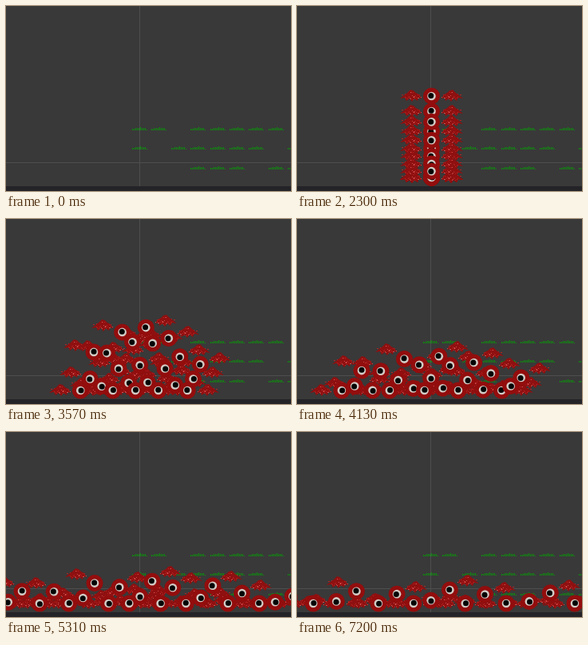
Recreate the animation shown at these times as an HTML page with a canvas. Size 357 by 232 pixels, loop 7.3 s.

```html
<!DOCTYPE html>
<html>
<head>
<meta charset="utf-8">
<style>
html, body { margin: 0; width: 357px; height: 232px; overflow: hidden; background: #393939; }
canvas { display: block; }
</style>
</head>
<body>
<canvas id="stage" width="357" height="232"></canvas>
<script>
const g = document.getElementById('stage').getContext('2d');
const LOOP = 7300, COUNT = 23, FLOOR = 215, CENTER = 169;
const START = 800, BIRTH_GAP = 100, COLLAPSE = 2500, PILED = 3020;
const clamp = v => Math.max(0, Math.min(1, v));
const mix = (a, b, p) => a + (b - a) * p;
const hash = n => Math.abs(Math.sin(n * 12.9898) * 43758.5453) % 1;

// Linear track through [time, value] pairs, held at both ends.
function track(keys, t) {
  let j = 0;
  while (j < keys.length - 2 && t >= keys[j + 1][0]) j++;
  const [t0, a] = keys[j], [t1, b] = keys[j + 1];
  return mix(a, b, clamp((t - t0) / (t1 - t0)));
}
const columnTop = [[START, 196], [1510, 168], [2300, 113], [2720, 85]];
const spread = [[PILED, 37], [4130, 111], [4630, 155], [6050, 227], [7200, 312]];
const height = [[PILED, 122], [4130, 50], [4630, 44], [6050, 25], [7200, 24]];
const layers = [0, 0.45, 1, 0.2, 0.8];

// The heap widens and sinks; its layers repeat from left to right.
function inHeap(i, t) {
  const s = (i - 11) / 11;
  const rise = track(height, t) * layers[i % 5] * (1 - 0.54 * s * s) - 7;
  return {
    x: CENTER + track(spread, t) * s * (0.72 + 0.28 * Math.abs(s)) + 4 * hash(i) - 2,
    y: FLOOR - Math.max(0, rise)
  };
}

// The highest in the heap is born first and leads the column.
const rank = [];
[...Array(COUNT).keys()]
  .sort((a, b) => inHeap(a, PILED).y - inHeap(b, PILED).y)
  .forEach((i, k) => rank[i] = k);

function place(i, t) {
  const k = rank[i];
  if (t < START + BIRTH_GAP * k) return null;
  const heap = inHeap(i, t);
  const p = clamp((t - COLLAPSE) / (PILED - COLLAPSE)) ** 2;
  const y = Math.min(FLOOR, track(columnTop, t) + 19 * k ** 0.77);
  return { i, x: mix(CENTER - 0.5, heap.x, p), y: mix(y, heap.y, p) };
}

function disc(x, y, r, color) {
  g.fillStyle = color;
  g.beginPath();
  g.arc(x, y, r, 0, 7);
  g.fill();
}

const wing = new Path2D('M-14 3L-9-1L-5-4L-1-8L3-7L6-4L10-2L13 3L9 2L8 6L4 3L1 7L-2 3L-6 6L-8 2Z');

function drawWing(x, y, side) {
  g.save();
  g.translate(Math.round(x), Math.round(y));
  g.scale(side, 1);
  g.fillStyle = '#8f1010';
  g.fill(wing);
  for (let n = 1; n < 36; n++) {
    const u = hash(n) * 24 - 12;
    const v = (hash(n + 50) * 2 - 1.1) * (6 - Math.abs(u) * 0.35);
    g.fillStyle = n % 3 ? '#b52424' : '#cc5050';
    g.fillRect(Math.round(u), Math.round(v), 1, 1);
  }
  g.restore();
}

function drawWings({ i, x, y }, t) {
  const lean = (i < 9 ? 1 : -1) * clamp((t - PILED) / 800);
  const tilt = 0.45 * lean * clamp((FLOOR - y) / 16);
  const dx = 25.5 * Math.cos(tilt), dy = 25.5 * Math.sin(tilt);
  drawWing(x - dx, y - dy, 1);
  drawWing(x + dx, y + dy, -1);
}

function drawEye({ i, x, y }) {
  const gaze = i * 2.4;
  disc(x, y, 10.5, '#930d0d');
  disc(x, y, 5.3, '#d2cbc5');
  disc(x + 0.8 * Math.cos(gaze), y + 0.8 * Math.sin(gaze), 3.5, '#050505');
}

function drawTuft(x, y) {
  for (let dx = -9; dx <= 9; dx += 2) {
    const h = 1 + Math.round((1 - Math.abs(dx) / 10) * 2 + hash(dx + 30));
    g.fillRect(x + dx, y - h, 1, h);
  }
}
const grass = ['##.#####', '#.#####.#', '...###.##'];

function drawScene() {
  g.fillStyle = '#393939';
  g.fillRect(0, 0, 357, 232);
  g.fillStyle = '#4e4e4e';
  g.fillRect(167, 0, 1, 226);
  g.fillRect(0, 196, 357, 1);
  g.fillStyle = '#0a940a';
  grass.forEach((row, r) => [...row].forEach((cell, c) => {
    if (cell === '#') drawTuft(Math.round(167 + c * 24.4), Math.round(156 + r * 24.4));
  }));
}

function draw(t) {
  drawScene();
  const born = [...Array(COUNT).keys()].map(i => place(i, t)).filter(Boolean);
  born.forEach(p => drawWings(p, t));
  born.forEach(drawEye);
  g.fillStyle = '#242328';
  g.fillRect(0, 226, 357, 6);
}

const begin = performance.now();
function frame() {
  draw((performance.now() - begin) % LOOP);
  requestAnimationFrame(frame);
}
frame();
</script>
</body>
</html>
```
